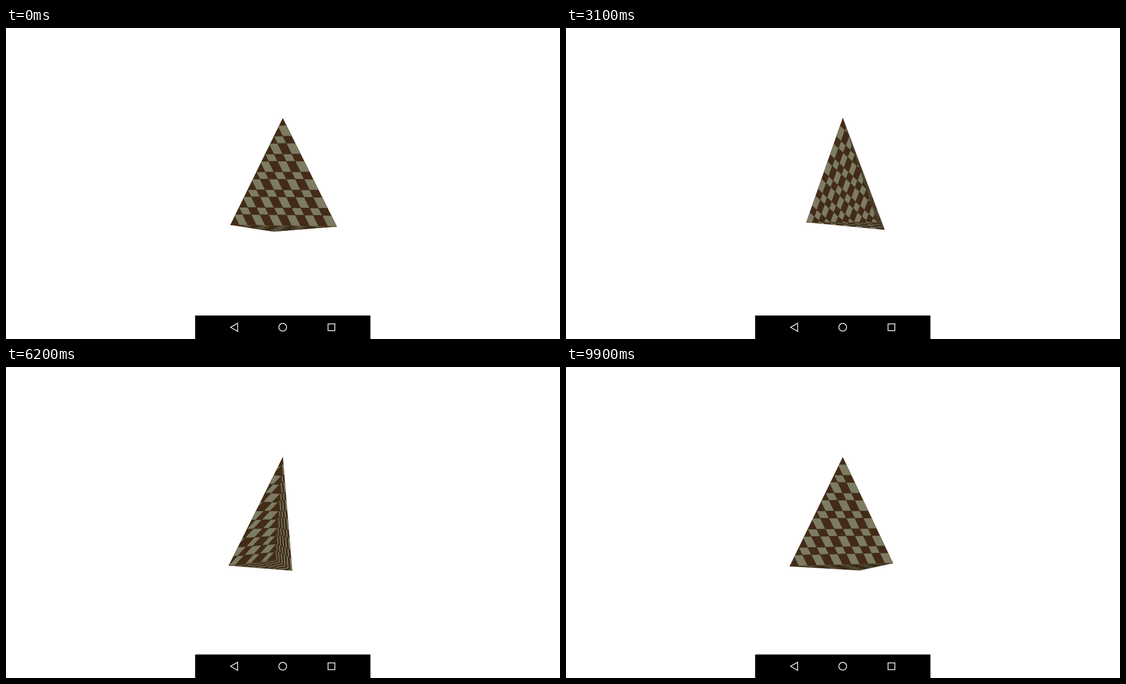
Animation of 998 by 561 pixels, one loop 10000 ms. Source, as an HTML page with a canvas:

```html
<!DOCTYPE html>
<html lang="en">
<head>
<meta charset="utf-8">
<title>Rotating pyramid</title>
<style>
  html, body { margin: 0; width: 100%; height: 100%; overflow: hidden; background: #fff; }
  canvas { display: block; }
</style>
</head>
<body>
<canvas id="stage" width="998" height="561"></canvas>
<script>
const ctx = document.getElementById('stage').getContext('2d');

const LOOP = 10000, STEP = 100;
const CX = 498.6, CY = 259.7;
const DIST = 10, FOCAL = 259.5 / Math.tan(Math.PI / 12);
const DARK = '#432b17', LIGHT = '#7d7b62', LINE = 'rgba(38, 32, 16, 0.6)';

// Turn of the pyramid in degrees at given times
const TURN = [[0, -9], [2100, -153.5], [4100, -294], [6200, -441],
              [7500, -531], [8400, -594], [9900, -703.5]];

// Texture coordinates of apex, left, right and corner vertices
const UV = [[1, 0], [0, 1], [1, 1], [0, 0.5]];
const FACES = [[0, 1, 2], [0, 2, 3], [0, 3, 1], [1, 3, 2]];

// Cell borders: even columns, rows alternating narrow and wide
const CELLS = 12;
const colAt = i => i / CELLS;
const rowAt = i => (Math.floor(i / 2) + (i % 2) * 0.4) / 6;

function turnAt(t) {
  let i = 0;
  while (i < TURN.length - 2 && t > TURN[i + 1][0]) i++;
  const [t0, a0] = TURN[i], [t1, a1] = TURN[i + 1];
  return a0 + (a1 - a0) * (t - t0) / (t1 - t0);
}

function vertices(deg) {
  const base = off => {
    const a = (deg + off) * Math.PI / 180;
    return [Math.sin(a), -1, Math.cos(a)];
  };
  return [[0, 1, 0], base(-90), base(90), base(0)];
}

function project([x, y, z]) {
  const s = FOCAL / (DIST - z);
  return [CX + x * s, CY - y * s];
}

function path(points, closed = true) {
  ctx.beginPath();
  points.forEach(([x, y], i) => i ? ctx.lineTo(x, y) : ctx.moveTo(x, y));
  if (closed) ctx.closePath();
}

const cross = ([ax, ay], [bx, by], [cx, cy]) =>
  (bx - ax) * (cy - ay) - (by - ay) * (cx - ax);

// Maps texture coordinates to the screen through the plane of a face
function mapper(face, verts) {
  const [p, q, r] = face.map(i => UV[i]);
  const [P, Q, R] = face.map(i => verts[i]);
  const area = cross(p, q, r);
  return (u, v) => {
    const b = cross(p, [u, v], r) / area;
    const c = cross(p, q, [u, v]) / area;
    return project(P.map((k, i) => k + (Q[i] - k) * b + (R[i] - k) * c));
  };
}

function drawFace(face, verts) {
  const tri = face.map(i => project(verts[i]));
  if (cross(...tri) >= 0) return;   // only the inner sides are seen

  path(tri);
  ctx.fillStyle = ctx.strokeStyle = DARK;
  ctx.lineWidth = 0.5;
  ctx.fill();
  ctx.stroke();

  const at = mapper(face, verts);
  ctx.save();
  path(tri);
  ctx.clip();
  ctx.fillStyle = LIGHT;
  for (let r = 0; r < CELLS; r++) {
    for (let c = r % 2; c < CELLS; c += 2) {
      const u0 = colAt(c), u1 = colAt(c + 1), v0 = rowAt(r), v1 = rowAt(r + 1);
      path([at(u0, v0), at(u1, v0), at(u1, v1), at(u0, v1)]);
      ctx.fill();
    }
  }
  ctx.strokeStyle = LINE;
  ctx.lineWidth = 0.8;
  for (let i = 1; i < CELLS; i++) {
    path([at(colAt(i), 0), at(colAt(i), 1)], false);
    ctx.stroke();
    path([at(0, rowAt(i)), at(1, rowAt(i))], false);
    ctx.stroke();
  }
  ctx.restore();
}

function drawBar() {
  ctx.fillStyle = '#000';
  ctx.fillRect(340.7, 518.6, 315.8, 43);
  ctx.strokeStyle = '#f4f4f4';
  ctx.lineWidth = 1.5;
  path([[404.6, 539.8], [417.3, 532.5], [417.3, 547.1]]);
  ctx.stroke();
  ctx.beginPath();
  ctx.arc(498.5, 539.8, 7, 0, Math.PI * 2);
  ctx.stroke();
  ctx.strokeRect(580.2, 533.7, 12.2, 12.2);
}

function draw(t) {
  ctx.fillStyle = '#fff';
  ctx.fillRect(0, 0, 998, 561);
  const verts = vertices(turnAt(t));
  FACES.forEach(face => drawFace(face, verts));
  drawBar();
}

const start = performance.now();
function tick() {
  const t = (performance.now() - start) % LOOP;
  draw(Math.floor(t / STEP) * STEP);
  requestAnimationFrame(tick);
}
tick();
</script>
</body>
</html>
```
